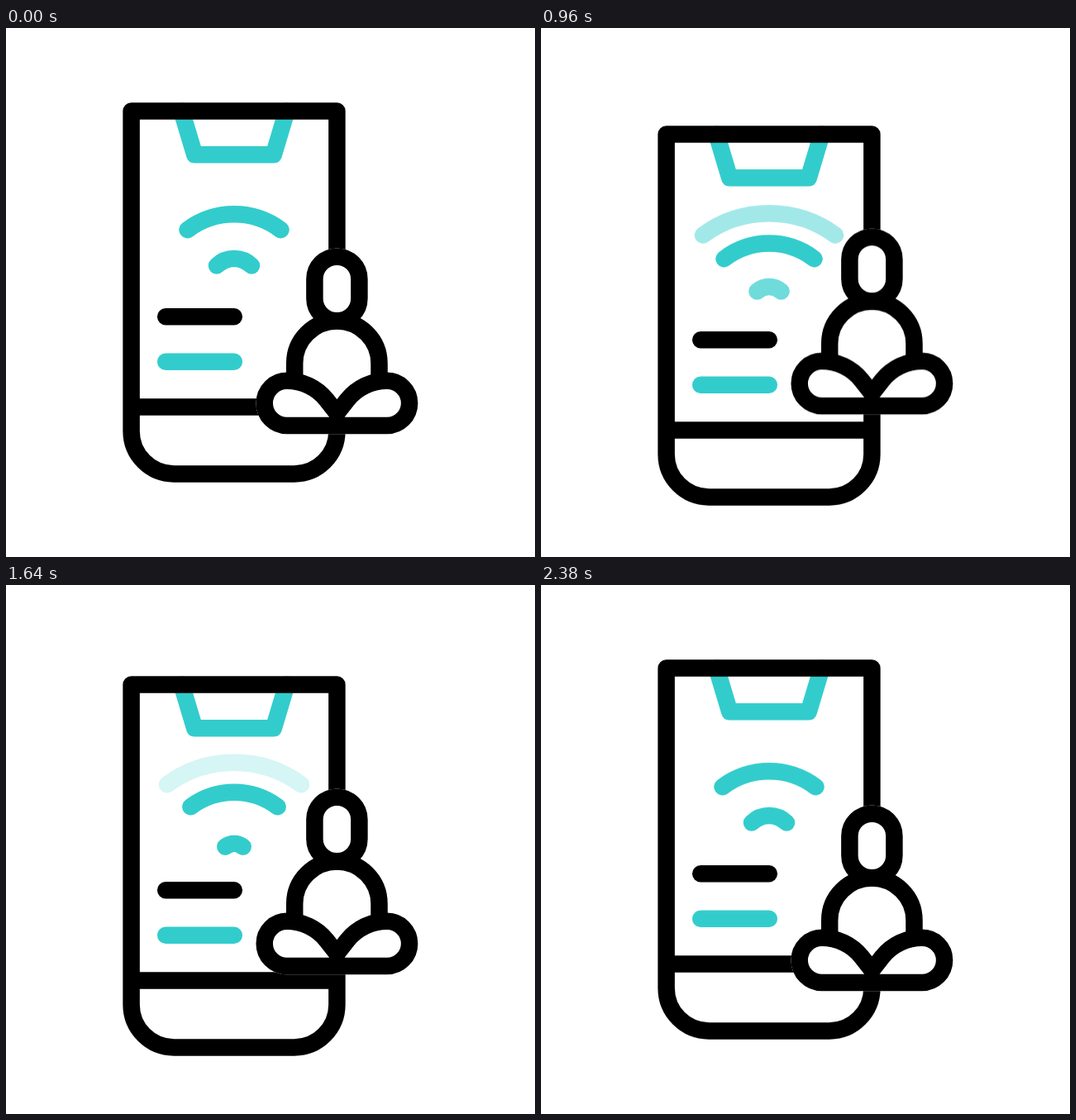
An HTML page that plays this animation: 640 by 640 pixels, repeating every 2.4 s.

```html
<!DOCTYPE html>
<html lang="en">
<head>
<meta charset="utf-8">
<title>Meditation app</title>
<style>
  html, body { margin: 0; width: 100%; height: 100%; overflow: hidden; background: #fff; }
  svg { display: block; width: 100%; height: 100%; }

  .line { fill: none; stroke: #000; stroke-width: 20.5; stroke-linecap: round; stroke-linejoin: round; }
  .teal { stroke: #3cc; }
  .back { fill: #fff; stroke: #fff; }

  .phone, .person, .wave { animation: 2400ms linear infinite; }
  .phone { animation-name: phone; }
  .person { animation-name: person; }
  .w1 { animation-name: w1; }
  .w2 { animation-name: w2; }
  .w3 { animation-name: w3; }
  .w4 { animation-name: w4; }

  @keyframes phone {
    0% { transform: translateY(0); animation-timing-function: cubic-bezier(.29, 0, .67, 1); }
    49.2% { transform: translateY(30.8px); animation-timing-function: cubic-bezier(.28, 0, .67, 1); }
    100% { transform: translateY(0); }
  }
  @keyframes person {
    0% { transform: translateY(0); animation-timing-function: cubic-bezier(.29, 0, .67, 1); }
    50.4% { transform: translateY(-26.6px); }
    53.3% { transform: translateY(-26.6px); animation-timing-function: cubic-bezier(.33, 0, .67, 1); }
    100% { transform: translateY(0); }
  }

  /* Each wave travels outwards; the last two settle where the first two began. */
  @keyframes w1 {
    0% { d: path("M219.5 244.2A93.9 93.9 0 0 1 332.5 244.2"); animation-timing-function: cubic-bezier(.4, 0, .75, .7); }
    14.17% { d: path("M214 239A103.6 103.6 0 0 1 338 239"); }
    25% { d: path("M206.5 232.5A116 116 0 0 1 345.5 232.5"); }
    0%, 27% { opacity: 1; }
    40% { d: path("M196 222.5A135.7 135.7 0 0 1 356 222.5"); opacity: .45; }
    51%, 100% { d: path("M190 215A146 146 0 0 1 362 215"); opacity: 0; }
  }
  @keyframes w2 {
    0% { d: path("M255 287.5A30.2 30.2 0 0 1 297 287.5"); animation-timing-function: cubic-bezier(.4, 0, .75, .7); }
    14.17% { d: path("M248 280.2A43.5 43.5 0 0 1 304 280.2"); }
    25% { d: path("M238 269.6A59.6 59.6 0 0 1 314 269.6"); }
    40% { d: path("M221.5 251.3A89 89 0 0 1 330.5 251.3"); }
    0%, 46.7% { opacity: 1; }
    60% { d: path("M200.5 228.3A127 127 0 0 1 351.5 228.3"); opacity: .42; }
    76%, 100% { d: path("M190 215A146 146 0 0 1 362 215"); opacity: 0; }
  }
  @keyframes w3 {
    0%, 31.7% { d: path("M273 302A5 5 0 0 1 279 302"); opacity: 0; }
    40% { d: path("M261.5 290.5A22 22 0 0 1 290.5 290.5"); opacity: .7; }
    43.5% { opacity: 1; }
    60% { d: path("M233 258.2A73 73 0 0 1 319 258.2"); animation-timing-function: cubic-bezier(.3, .5, .65, 1); }
    76.67%, 100% { d: path("M219.5 244.2A93.9 93.9 0 0 1 332.5 244.2"); }
    100% { opacity: 1; }
  }
  @keyframes w4 {
    0%, 55.4% { d: path("M274 304A4 4 0 0 1 278 304"); opacity: 0; }
    60% { d: path("M270.8 301A7.8 7.8 0 0 1 281.2 301"); opacity: .42; }
    67% { opacity: 1; }
    76.67% { d: path("M260 292.3A26.8 26.8 0 0 1 292 292.3"); animation-timing-function: cubic-bezier(.25, .5, .6, 1); }
    100% { d: path("M255 287.5A30.2 30.2 0 0 1 297 287.5"); opacity: 1; }
  }
</style>
</head>
<body>
<svg viewBox="0 0 640 640">
  <defs>
    <g id="figure">
      <path d="M349.2 424V405.7a51.15 51.15 0 0 1 102.3 0V424"/>
      <rect x="373.4" y="276.7" width="54" height="77.6" rx="27"/>
      <path d="M400.4 481H339.8a27.1 27.1 0 0 1 0-54.2c18.6 0 36.2 8.4 47.9 22.9L400.4 465.8L413.1 449.7c11.7-14.5 29.3-22.9 47.9-22.9a27.1 27.1 0 0 1 0 54.2z"/>
    </g>
  </defs>

  <g class="line phone">
    <path class="teal" d="M212.4 100.5L228.2 153.2H323.8L339.6 100.5"/>
    <path d="M151.6 100.5H400.4V487.8a51.6 51.6 0 0 1-51.6 51.6H203.2a51.6 51.6 0 0 1-51.6-51.6zM151.6 458.6H400.4"/>
    <path d="M193.2 349.2H275.8"/>
    <path class="teal" d="M193.2 403.7H275.8"/>
    <g class="teal">
      <path class="wave w1"/>
      <path class="wave w2"/>
      <path class="wave w3"/>
      <path class="wave w4"/>
    </g>
  </g>

  <g class="line person">
    <g class="back">
      <use href="#figure"/>
      <path d="M352 425h97v40h-97z"/>
    </g>
    <use href="#figure"/>
  </g>
</svg>
</body>
</html>
```
